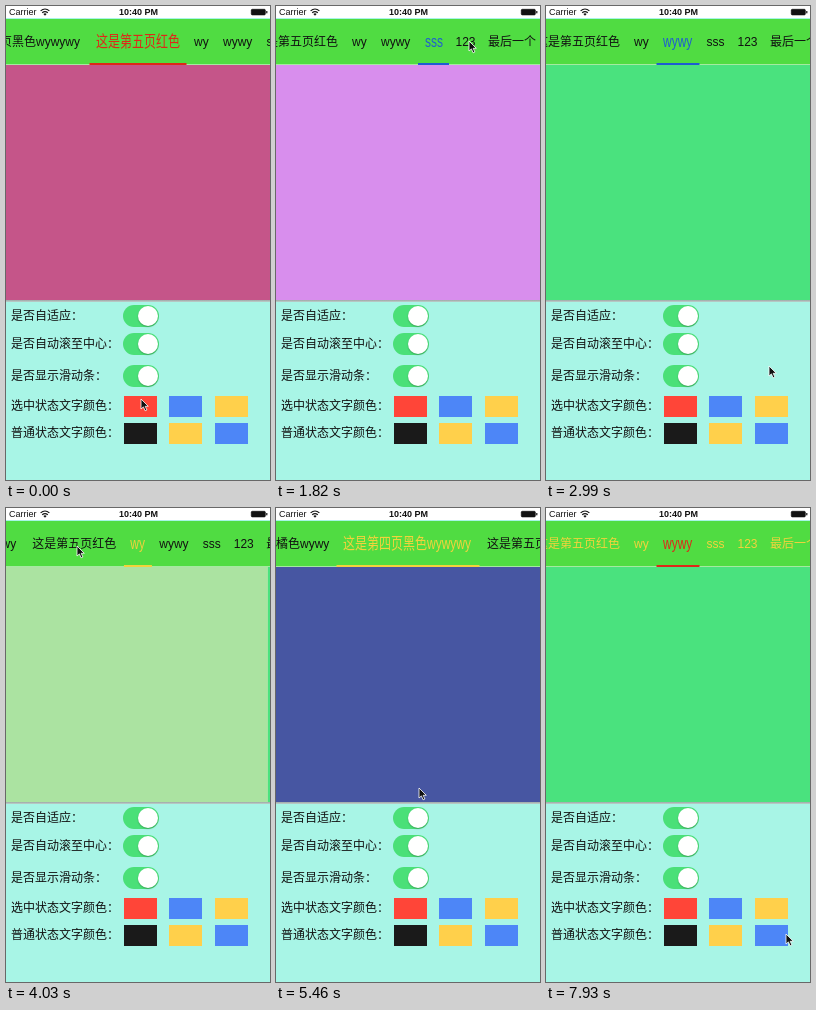
An HTML page that plays this animation: 264 px wide and 474 px high, repeating every 8 s.

```html
<!DOCTYPE html>
<html lang="zh-CN">
<head>
<meta charset="utf-8">
<title>Scrolling tabs</title>
<style>
html, body { margin: 0; width: 100%; height: 100%; overflow: hidden; }
body { position: relative; background: #a8f5e6; color: #111; font: 300 12px "Liberation Sans", "Noto Sans CJK SC", "Noto Sans CJK", sans-serif; }
div, span, svg { position: absolute; display: block; white-space: nowrap; }
#stage { left: 0; top: 0; width: 264px; height: 474px; overflow: hidden; background: #a8f5e6; }
#status { width: 264px; height: 12px; background: #fff; font-size: 9px; line-height: 12px; font-weight: 400; }
#clock { left: 113px; font-weight: 700; }
#nav { top: 13px; width: 264px; height: 46px; overflow: hidden; background: linear-gradient(#50dc42 45px, #a4eaa0 45px); }
#strip { left: 0; top: 0; height: 46px; }
#strip span { top: 0; height: 46px; line-height: 46px; }
#bar { top: 43.5px; left: 0; height: 2.5px; }
#view { top: 59px; width: 264px; height: 235px; overflow: hidden; }
#pages { left: 0; top: 0; }
#pages div { top: 0; width: 264px; height: 235px; }
#edge { top: 294px; width: 264px; height: 2px; background: linear-gradient(#9fa5a6, #bdd2cd); }
.label { left: 5px; line-height: 20px; }
.switch { left: 117px; width: 36px; height: 22px; border-radius: 11px; background: #4ae078; }
.switch::after { content: ""; position: absolute; right: 1px; top: 1px; width: 20px; height: 20px; border-radius: 50%; background: #fff; box-shadow: 0 1px 1.5px #0004; }
.swatch { width: 33px; height: 21px; }
</style>
</head>
<body>
<div id="stage">
  <div id="status">
    <span style="left:3px">Carrier</span>
    <svg style="left:34px;top:2px" width="10" height="8" viewBox="0 0 10 8" fill="none" stroke="#111" stroke-width="1.2">
      <path d="M.6 2.9Q5-.9 9.4 2.9M2.2 4.7Q5 2.4 7.8 4.7"/><path d="M3.4 5.9Q5 4.8 6.6 5.9L5 7.7Z" fill="#111" stroke="none"/>
    </svg>
    <span id="clock">10:40 PM</span>
    <svg style="left:244px;top:2px" width="18" height="8">
      <rect x="1.3" y="1.3" width="14" height="5.6" rx="1" fill="#111" stroke="#111" stroke-width=".7"/><rect x="16.2" y="3" width="1.2" height="2.3" fill="#111"/>
    </svg>
  </div>
  <div id="nav"><div id="strip"><div id="bar"></div></div></div>
  <div id="view"><div id="pages"></div></div>
  <div id="edge"></div>
  <div id="panel"></div>
  <svg id="cursor" style="left:0;top:0" width="12" height="16" viewBox="-1 -1 12 16">
    <path d="M0 0V10L2.4 7.9L4.1 11.8L5.9 11L4.2 7.3H7.3Z" fill="#111" stroke="#fff" stroke-width=".8" stroke-linejoin="round"/>
  </svg>
</div>
<script>
const LOOP = 8000, STEP = 130, SLIDE = 300, WIDTH = 264, MAX_SCROLL = 166;
const BLACK = [17, 17, 17], RED = [222, 40, 24], BLUE = [31, 92, 210], YELLOW = [242, 211, 60];

// label, left edge, width, page colour
const tabs = [
  ["这是第三页橘色wywy", -127, 113, "#e8a04a"],
  ["这是第四页黑色wywywy", 0, 130, "#4756a2"],
  ["这是第五页红色", 144, 84, "#c55589"],
  ["wy", 242, 15, "#abe3a1"],
  ["wywy", 271, 30, "#4ae27e"],
  ["sss", 314.5, 18, "#d88eed"],
  ["123", 345.5, 20, "#e6d28a"],
  ["最后一个", 378, 48, "#8ac6e6"]
].map(([text, x, w, color]) => ({ text, x, w, color }));

// time, value
const picks = [[0, 2], [1200, 3], [1500, 5], [2080, 4], [3747, 3], [4120, 2], [4800, 1], [7130, 2], [7430, 4]];
const activeInk = [[0, RED], [650, BLUE], [3250, YELLOW], [5720, RED]];
const normalInk = [[0, BLACK], [6370, YELLOW]];
// time, x, y
const path = [
  [0, 135, 393], [260, 146, 412], [650, 176, 400], [910, 178, 398], [1040, 184, 250], [1170, 193, 37],
  [1820, 193, 35], [2080, 120, 37], [2400, 122, 39], [2730, 200, 330], [2990, 223, 360], [3250, 222, 398],
  [3400, 220, 398], [3640, 95, 40], [3770, 93, 38], [4030, 71, 38], [5000, 71, 38], [5460, 143, 280],
  [5720, 135, 398], [6000, 136, 400], [6250, 178, 423], [6500, 178, 423], [6890, 172, 367],
  [7120, 222, 38], [7540, 222, 38], [7930, 240, 426]
];

const $ = id => document.getElementById(id);
const mix = (a, b, k) => a + (b - a) * k;
const ease = p => (1 - Math.cos(Math.PI * p)) / 2;
const lastAt = (list, t) => list.findLastIndex(row => row[0] <= t);
const valueAt = (list, t) => list[lastAt(list, t)][1];
const rgb = c => `rgb(${c.map(Math.round)})`;

function add(parent, tag, css, text = "", name = "") {
  const el = document.createElement(tag);
  el.style.cssText = css;
  el.textContent = text;
  el.className = name;
  parent.append(el);
  return el;
}

tabs.forEach((tab, i) => {
  tab.el = add($("strip"), "span", `left:${tab.x}px`, tab.text);
  add($("pages"), "div", `left:${i * WIDTH}px;background:${tab.color}`);
  tab.scroll = Math.min(tab.x + tab.w / 2 - WIDTH / 2, MAX_SCROLL);
});

["是否自适应：", "是否自动滚至中心：", "是否显示滑动条：", "选中状态文字颜色：", "普通状态文字颜色："].forEach((text, i) => {
  const y = [310, 338, 370, 400, 427][i] - 296;
  add($("panel"), "span", `top:${y - 10}px`, text, "label");
  if (i < 3) add($("panel"), "div", `top:${y - 11}px`, "", "switch");
});
$("panel").style.top = "296px";
[["#ff4538", "#4d86f7", "#ffd04b"], ["#1a1a1a", "#ffd04b", "#4d86f7"]].forEach((row, r) =>
  row.forEach((color, c) =>
    add($("panel"), "div", `left:${117.5 + c * 45.7}px;top:${94 + r * 27}px;background:${color}`, "", "swatch")));

function draw(t) {
  const n = lastAt(picks, t);
  const to = picks[n][1], from = picks[Math.max(n - 1, 0)][1];
  const k = n ? ease(Math.min((t - picks[n][0]) / SLIDE, 1)) : 1;
  const a = tabs[from], b = tabs[to];
  const active = valueAt(activeInk, t), normal = valueAt(normalInk, t);

  $("strip").style.transform = `translateX(${-mix(a.scroll, b.scroll, k)}px)`;
  $("pages").style.transform = `translateX(${-mix(from, to, k) * WIDTH}px)`;
  Object.assign($("bar").style, {
    transform: `translateX(${mix(a.x, b.x, k) - 6.5}px)`,
    width: mix(a.w, b.w, k) + 13 + "px",
    background: rgb(active)
  });
  tabs.forEach((tab, i) => {
    const on = i === to ? k : i === from ? 1 - k : 0;
    tab.el.style.color = rgb(normal.map((v, j) => mix(v, active[j], on)));
    tab.el.style.transform = `scaleY(${1 + 0.33 * on})`;
  });

  const i = lastAt(path, t);
  const p = path[i], q = path[i + 1] || p;
  const m = q === p ? 0 : ease((t - p[0]) / (q[0] - p[0]));
  $("cursor").style.transform = `translate(${mix(p[1], q[1], m) - 1}px, ${mix(p[2], q[2], m) - 1}px)`;
}

const start = performance.now();
function tick() {
  const t = (performance.now() - start) % LOOP;
  draw(Math.floor(t / STEP) * STEP);
  requestAnimationFrame(tick);
}
tick();
</script>
</body>
</html>
```
